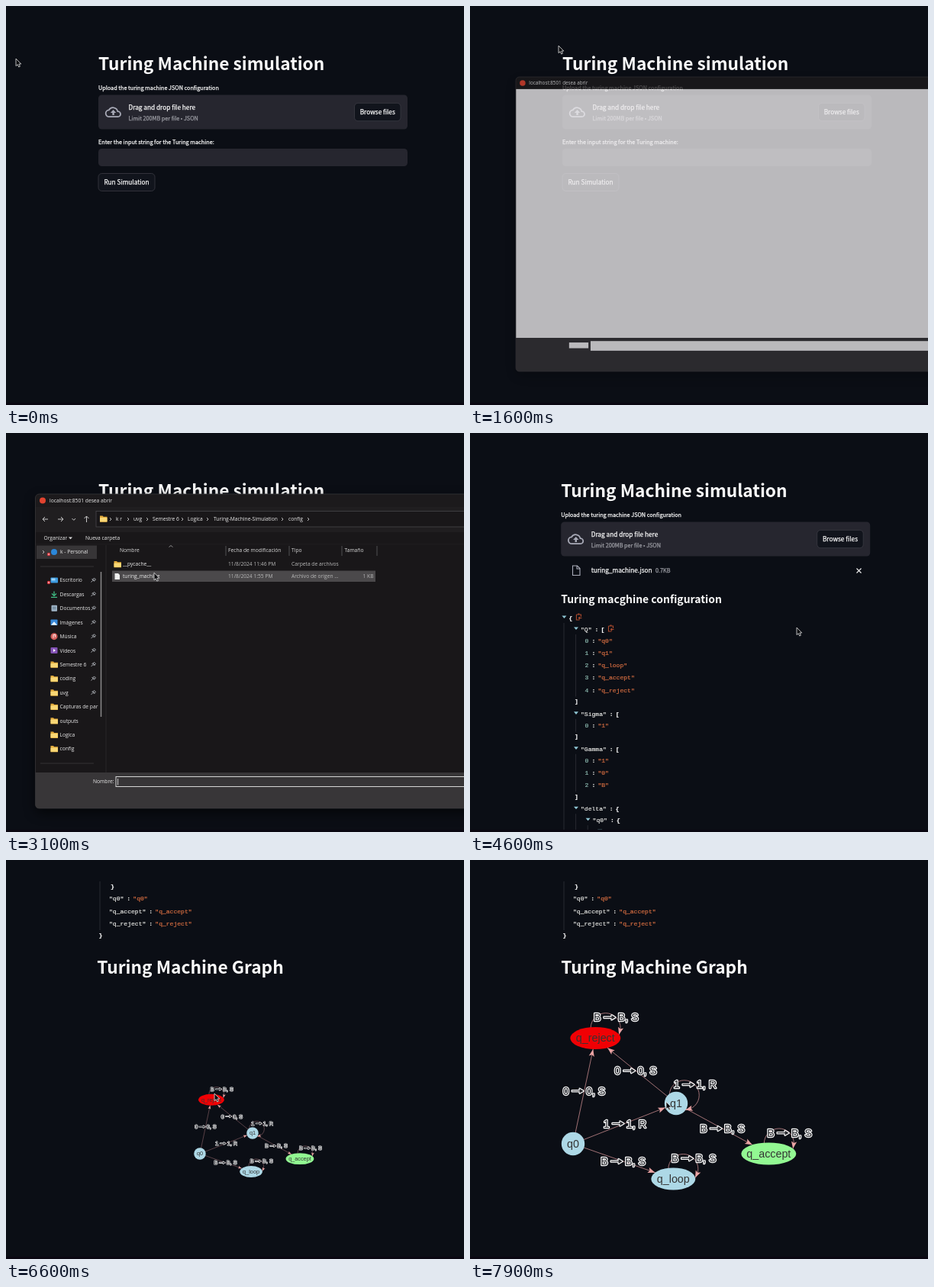
Animation of 600 by 523 pixels, one loop 8 s. Source, as an HTML page:

```html
<!DOCTYPE html>
<html lang="en">
<head>
<meta charset="utf-8">
<title>Turing Machine simulation</title>
<style>
  html, body { margin: 0; width: 100%; height: 100%; overflow: hidden; background: #0b0e15; }
  svg { display: block; width: 600px; height: 523px; }
  text { white-space: pre; }
  .sans { font-family: "Noto Sans CJK JP", "Noto Sans CJK SC", "Noto Sans CJK", "Open Sans", sans-serif; }
  .small { stroke-width: .25; }
  .mono { font: 8.05px "Liberation Mono", "DejaVu Sans Mono", monospace; }
  .mono text { stroke-width: .2; }
  .ui { font: 6.7px "Open Sans", "Noto Sans", sans-serif; }
  .graph { font: 14.3px "Liberation Sans", Arial, sans-serif; text-anchor: middle; }
  .edge { fill: #26272c; stroke: #fff; stroke-width: 2.4; stroke-linejoin: round; paint-order: stroke; }
</style>
</head>
<body>
<svg id="stage" viewBox="0 0 600 523">
  <defs><filter id="blur" x="-10%" y="-10%" width="120%" height="120%"><feGaussianBlur stdDeviation="8"/></filter></defs>
  <rect width="600" height="523" fill="#0b0e15"/>
  <g id="startPage" class="sans"></g>
  <g id="resultPage" class="sans"></g>
  <rect width="600" height="28" fill="#0b0e15"/>
  <rect y="520" width="600" height="3" fill="#0a0711"/>
  <g id="dialog" class="ui"></g>
  <path id="cursor" d="M0 0V9.6L2.2 7.7 3.7 11 5.4 10.2 3.9 7H6.8Z" fill="#0c0d10" stroke="#e4e4e4" stroke-width=".8" stroke-linejoin="round"/>
</svg>
<script>
const $ = id => document.getElementById(id);
const LOOP = 8000, STEP = 100;

const text = (x, y, s, fill = '#fafafa', extra = '') => `<text x="${x}" y="${y}" fill="${fill}" ${extra}>${s}</text>`;
const heading = (x, y, s, size) => text(x, y, s, '#fafafa', `font-size="${size}" font-weight="700"`);
const small = (x, y, s, size, fill = '#fafafa') => text(x, y, s, fill, `class="small" stroke="${fill}" font-size="${size}"`);
const rect = (x, y, w, h, fill, extra = '') => `<rect x="${x}" y="${y}" width="${w}" height="${h}" fill="${fill}" ${extra}/>`;
const line = (d, stroke, width = 1) => `<path d="${d}" fill="none" stroke="${stroke}" stroke-width="${width}"/>`;
const show = (id, on) => $(id).setAttribute('display', on ? 'inline' : 'none');

// ---- Web page ----
const button = (x, y, w, h, label, id) => `<g id="${id}" color="#fafafa" stroke="#3b3c45">` +
  rect(x, y, w, h, '#11141c', 'rx="4.6" stroke-width=".8"') +
  text(x + w / 2, y + h / 2 + 3.2, label, 'currentColor', 'class="small" stroke="currentColor" font-size="8.25" text-anchor="middle"') + '</g>';

function uploader(id) {
  return heading(121, 84, 'Turing Machine simulation', 22.7) +
    small(121, 110, 'Upload the turing machine JSON configuration', 7.25) +
    rect(121, 116.5, 405, 45, '#26262f', 'rx="4.6"') +
    `<g transform="translate(130 128.5) scale(.88)">
      <path d="M6 19a5 5 0 0 1-.5-10A7 7 0 0 1 18.5 11a4 4 0 0 1 .5 8z" fill="none" stroke="#a9abb8" stroke-width="2"/>
      <path d="M12 8.5l4.2 4.5h-2.8v3.5h-2.8V13H7.8z" fill="#a9abb8"/></g>` +
    small(160.5, 136, 'Drag and drop file here', 8.25) +
    small(160.5, 150, 'Limit 200MB per file • JSON', 7.25, '#9b9ca3') +
    button(456.5, 127.3, 60.5, 23.4, 'Browse files', id);
}

$('startPage').innerHTML = uploader('browse') +
  small(121, 181, 'Enter the input string for the Turing machine:', 7.25) +
  rect(121, 187, 405, 23, '#26262f', 'rx="4.6"') +
  button(121, 219.5, 74, 23, 'Run Simulation', 'run');

// ---- JSON tree ----
const tape = (state, symbol, move) => [state, symbol, move];
const halt = name => ({ B: tape(name, 'B', 'S') });
const machine = {
  Q: ['q0', 'q1', 'q_loop', 'q_accept', 'q_reject'],
  Sigma: ['1'],
  Gamma: ['1', '0', 'B'],
  delta: {
    q0: { 0: tape('q_reject', '0', 'S'), 1: tape('q1', '1', 'R'), B: tape('q_loop', 'B', 'S') },
    q1: { 0: tape('q_reject', '0', 'S'), 1: tape('q1', '1', 'R'), B: tape('q_accept', 'B', 'S') },
    q_loop: halt('q_loop'), q_accept: halt('q_accept'), q_reject: halt('q_reject')
  },
  q0: 'q0', q_accept: 'q_accept', q_reject: 'q_reject'
};
const CHAR = 4.83, INDENT = 15.6, ROW = 16.2;
let rowY = 242;

const copyIcon = (x, y) => line(`M${x} ${y - 3}h6v3M${x} ${y - 3}v7h4M${x + 2} ${y - 4}h2M${x + 7} ${y + 1.5}h-4m1.5-1.5l-1.5 1.5 1.5 1.5`, '#a84a2e', 1.1);

function tree(key, value, level, inArray) {
  const x = 123.4 + level * INDENT, leaf = typeof value === 'string';
  const keyX = leaf ? x - 4 : x + 6;
  const label = key === null ? '' : inArray ? key : `"${key}"`;
  const end = keyX + label.length * CHAR;
  const put = (px, s, fill, weight = 400) => text(px, rowY + 2.7, s, fill, `stroke="${fill}" font-weight="${weight}"`);
  let out = label && put(keyX, label, inArray ? '#8fbcb2' : '#e9e9e6') + put(end + 4, ':', '#f4f4f0', 700);
  const valueX = label ? end + 12 : keyX;
  if (leaf) return out + put(valueX, `"${value}"`, '#d96f42');

  const list = Array.isArray(value), top = rowY;
  out += `<path d="M${x - 3} ${top - 2.5}h6l-3 3.6z" fill="#8fc6d4"/>` + put(valueX, list ? '[' : '{', '#fafafa', 700);
  if (level === 0 || key === 'Q') out += copyIcon(valueX + 10, top - 1);
  rowY += 15;
  for (const [k, v] of Object.entries(value)) {
    out += tree(k, v, level + 1, list);
    rowY += ROW;
  }
  rowY -= 1.4;
  return out + line(`M${x - .4} ${top + 7}V${rowY - 6}`, '#30333a', .8) + put(x - 2, list ? ']' : '}', '#fafafa', 700);
}

// ---- State graph ----
const nodes = {
  q0: { x: 135, y: 372, rx: 15.2, ry: 15.2, fill: '#add8e6' },
  q1: { x: 270, y: 319, rx: 15.2, ry: 15.2, fill: '#add8e6' },
  q_reject: { x: 164.3, y: 233.5, rx: 33, ry: 14.6, fill: '#f00004' },
  q_loop: { x: 266.3, y: 418, rx: 29, ry: 14.6, fill: '#add8e6' },
  q_accept: { x: 391.3, y: 385, rx: 36, ry: 14.6, fill: '#92f892' }
};
const LOOP_RADIUS = 19.5;

const arrowHead = (x, y, angle) =>
  `<path d="M0 0L-9.5 -3.6 -7.5 0 -9.5 3.6z" fill="#eaa3a3" transform="translate(${x} ${y}) rotate(${angle * 180 / Math.PI})"/>`;

const edgeLabel = (x, y, read, rest) => `<g class="edge" transform="translate(${x} ${y})">` +
  '<text x="-19.9" y="5" text-anchor="end">' + read + '</text>' +
  '<path d="M-16 -.6h10v-2.400l5 3 -5 3v-2.400h-10z"/>' +
  '<text x="2.3" y="5" text-anchor="start">' + rest + '</text></g>';

function rim(n, angle) {
  const r = 1 / Math.hypot(Math.cos(angle) / n.rx, Math.sin(angle) / n.ry);
  return [n.x + r * Math.cos(angle), n.y + r * Math.sin(angle)];
}

function graph() {
  let edges = '', labels = '', heads = '';
  for (const [from, rules] of Object.entries(machine.delta)) {
    for (const [read, [to, write, move]] of Object.entries(rules)) {
      const a = nodes[from], b = nodes[to], rest = `${write}, ${move}`;
      if (a === b) {
        const [cx, cy] = rim(a, -Math.PI / 4);
        const at = turn => [cx + LOOP_RADIUS * Math.cos(turn), cy + LOOP_RADIUS * Math.sin(turn)];
        const outside = ([x, y]) => Math.hypot((x - a.x) / a.rx, (y - a.y) / a.ry) > 1;
        let turn = 0;
        while (outside(at(turn))) turn += .02;
        edges += `<circle cx="${cx}" cy="${cy}" r="${LOOP_RADIUS}" fill="none" stroke="#b27c7f" stroke-width=".9"/>`;
        heads += arrowHead(...at(turn), turn + Math.PI / 2 - .2);
        labels += edgeLabel(...at(-Math.PI / 4), read, rest);
      } else {
        const angle = Math.atan2(b.y - a.y, b.x - a.x);
        edges += line(`M${a.x} ${a.y}L${b.x} ${b.y}`, '#b27c7f', .9);
        heads += arrowHead(...rim(b, angle + Math.PI), angle);
        labels += edgeLabel((a.x + b.x) / 2, (a.y + b.y) / 2, read, rest);
      }
    }
  }
  const shapes = Object.entries(nodes).map(([name, n]) =>
    `<ellipse cx="${n.x}" cy="${n.y}" rx="${n.rx}" ry="${n.ry}" fill="${n.fill}"/>` +
    text(n.x, n.y + 4.6, name, '#343434')).join('');
  return edges + labels + shapes + heads;
}

const jsonTree = tree(null, machine, 0, false);
const SCROLL_END = rowY - 98;

$('resultPage').innerHTML = `<g transform="translate(-1.8 0)">${uploader('browseAgain')}</g>` +
  line('M134.5 174h6l3.5 3.5v9h-9.5zM140 174v4h4', '#a9abb8', 1.1) +
  small(158.7, 183, 'turing_machine.json', 8.25) +
  small(243, 183, '0.7KB', 7.25, '#9b9ca3') +
  line('M506.5 177.5l6 6m0-6l-6 6', '#fafafa', 1.1) +
  heading(119.2, 222.7, 'Turing macghine configuration', 13.95) +
  `<g class="mono">${jsonTree}</g><g transform="translate(0 ${SCROLL_END})">` +
  heading(119.2, 149, 'Turing Machine Graph', 22.7) +
  `<g id="graph" class="graph">${graph()}</g></g>`;

// ---- File dialog ----
const LIGHT = '#ececec', DIM = '#b9b9b9';
const ui = (x, y, s, fill = LIGHT, extra = '') => text(x, y + 2.4, s, fill, extra);
const folder = (x, y) => `<path d="M${x} ${y - 4}h3.5l1.2 1.3h4.8v7h-9.5z" fill="#e2ab3c"/>` + rect(x, y - 1.6, 9.5, 5.3, '#f8d775', 'rx=".6"');
const chevron = (x, y) => line(`M${x - 1} ${y - 2}l2 2-2 2`, '#d0d0d0', .9);
const badge = (x, y) => `<circle cx="${x}" cy="${y}" r="2.2" fill="#d8343c"/>` + line(`M${x - .8} ${y - .8}l1.6 1.6m0-1.6l-1.6 1.6`, '#fff', .6);
const pin = y => line(`M111.5 ${y + 2.5}l2-2m-1-2l3 3m-2-3.5l3 3m-2.5-2.5l1.5-1.5 2 2-1.5 1.5`, '#a9adb3', 1);

const places = {
  Escritorio: y => rect(58.5, y - 3.5, 9.5, 7, '#3d9be0', 'rx=".8"') + rect(59.5, y - 2.5, 5, 3, '#9bd4f7'),
  Descargas: y => line(`M63 ${y - 4}v6m-3-3l3 3 3-3M59 ${y + 4}h8`, '#3fba83', 1.3),
  Documentos: y => rect(59.5, y - 4, 7.5, 8, '#9fb4c6', 'rx=".8"') + line(`M61 ${y - 1.5}h4.5m-4.5 2h4.5`, '#496275', .8),
  'Imágenes': y => rect(58.5, y - 3.8, 9, 7.6, '#3587d8', 'rx=".8"') + `<path d="M59 ${y + 3.5}l4-4.5 4 4.5z" fill="#e8f4ff"/>`,
  'Música': y => `<circle cx="63" cy="${y}" r="4.5" fill="#d4605c"/>` + line(`M62 ${y + 2}v-4l2.5-.5v3.5`, '#fff', .9),
  'Vídeos': y => rect(58.5, y - 4, 9, 8, '#8453b5', 'rx="1"') + `<path d="M62 ${y - 2}l3 2-3 2z" fill="#fff"/>`
};
const sidebar = [...Object.keys(places), 'Semestre 6', 'coding', 'uvg', 'Capturas de par', 'outputs', 'Logica', 'config'];
const crumbs = [[144, 'k r', 160], [167, 'uvg', 185], [192, 'Semestre 6', 231], [238, 'Logica', 264], [272, 'Turing-Machine-Simulation', 362], [370, 'config']];
const columns = [[149, 'Nombre', 288], [291, 'Fecha de modificación', 371], [374, 'Tipo', 440], [443.5, 'Tamaño', 486]];

const fileRow = (y, name, date, kind, size) => ui(153, y, name) + ui(291, y, date, DIM) + ui(374, y, kind, DIM) +
  ui(481.5, y, size, DIM, 'text-anchor="end"');
const footer = fill => `<path d="M38.5 445h682v47h-677q-5 0-5-5z" fill="${fill}"/>`;

const content =
  rect(38.5, 97, 682, 34, '#201e20') + rect(38.5, 130, 682, 315, '#191719') +
  rect(38.5, 145.5, 682, .8, '#222022') +
  line('M55 113h-7m3-3l-3 3 3 3M68 113h7m-3-3l3 3-3 3M86.5 112l2.3 2.3 2.3-2.3M105.5 117v-8m-3 3l3-3 3 3', '#c9c9c9', 1) +
  rect(118, 102.5, 600, 20.5, '#191719', 'stroke="#48464a" stroke-width=".8"') +
  folder(123, 112.5) + chevron(137, 113) +
  crumbs.map(([x, s, next]) => ui(x, 113, s) + (next ? chevron(next, 113) : '')).join('') +
  `<g id="lastCrumb">${chevron(396, 113)}</g>` +
  ui(49.5, 138, 'Organizar') + '<path d="M82 136.5h5l-2.5 2.8z" fill="#ddd"/>' + ui(104, 138, 'Nueva carpeta') +
  rect(40, 147.5, 79, 17.5, '#373537') + chevron(49, 156) +
  '<circle cx="63" cy="156" r="4" fill="#2b87d9"/>' + ui(71, 156, 'k - Personal') +
  line('M45 175h70M45 433h70', '#3b393b', .8) +
  sidebar.map((name, i) => {
    const y = 193 + i * 18.42;
    return (places[name] ? places[name](y) : folder(58.5, y)) + ui(70.5, y, name) + (i < 9 ? pin(y) : '');
  }).join('') +
  `<g id="badges">${badge(56, 159)}${badge(56, 196)}</g>` +
  line('M124.5 182V372', '#8b898b', 1.5) + line('M131 147V445', '#2d2b2d', .8) +
  columns.map(([x, s, edge]) => ui(x, 154, s, '#dcdcdc') + line(`M${edge} 148v13`, '#59575a', .9)).join('') +
  line('M213.5 149.5l2.5-2 2.5 2', '#aaa', .8) +
  rect(139, 180.5, 345, 14.5, '#4b494b', 'id="rowHover"') +
  folder(141.5, 172) + fileRow(172, '__pycache__', '11/8/2024 11:46 PM', 'Carpeta de archivos', '') +
  '<path d="M142.5 184h4.5l2 2v6h-6.5z" fill="#eee"/>' +
  fileRow(188, 'turing_machine', '11/8/2024 1:55 PM', 'Archivo de origen ...', '1 KB') +
  footer('#383638') +
  ui(114, 457, 'Nombre:') + rect(144, 450.5, 600, 13, '#373537', 'stroke="#d5d5d5" stroke-width="1"') +
  rect(146.3, 453, .8, 8.5, '#eee', 'id="caret"');

const BLANK = '#ebe9eb';
const placeholder = rect(38.5, 97, 682, 348, BLANK) + footer('#343236') +
  rect(113, 451.5, 27, 8, BLANK) + rect(143, 449.5, 600, 13.5, BLANK);

$('dialog').innerHTML = rect(38.5, 86, 682, 412, '#000', 'rx="6" opacity=".6" filter="url(#blur)" id="shadow"') +
  rect(38.5, 80, 682, 412, '#1c1a1c', 'rx="5" id="frame"') +
  `<g id="placeholder">${placeholder}</g><g id="content">${content}</g>` +
  '<circle cx="48" cy="88.5" r="4" fill="#e2432f"/>' + ui(57, 88.5, 'localhost:8501 desea abrir') +
  rect(38.5, 80, 682, 412, 'none', 'rx="5" stroke="#3c3a3d" stroke-width=".7"');

// ---- Motion: each track is a list of [time, ...values] ----
const pointer = [[0, 13, 69], [400, 150, 200], [600, 290, 222], [900, 502, 150], [1000, 488, 140], [1200, 484, 138],
  [1600, 116, 52], [1800, 49, 79], [1900, 45, 66], [2200, 70, 95], [2700, 178, 174], [3000, 194, 183], [3600, 194, 184],
  [4300, 428, 255], [4700, 428, 255], [5400, 345, 300], [5900, 340, 310], [6500, 273, 306], [6700, 273, 306],
  [7300, 294, 329], [7500, 294, 329], [7900, 257, 317]];
const windowPose = [[1600, .937, .78], [1700, .985, 1], [1800, 1, 1], [3500, 1, 1], [3600, .94, .4]];
const zoom = [[6700, .511, 185, 194.9], [7300, 1, 37, 12], [7500, 1, 37, 12], [7900, 1, 0, 0]];

function sample(track, t) {
  const i = track.findIndex(k => k[0] > t);
  if (i === 0) return track[0].slice(1);
  if (i < 0) return track[track.length - 1].slice(1);
  const a = track[i - 1], b = track[i], p = (t - a[0]) / (b[0] - a[0]);
  return a.slice(1).map((v, j) => v + (b[j + 1] - v) * p);
}

function draw(t) {
  const [px, py] = sample(pointer, t);
  $('cursor').setAttribute('transform', `translate(${px} ${py})`);

  const uploaded = t >= 3900;
  show('startPage', !uploaded);
  show('resultPage', uploaded);
  const overBrowse = t >= 1000 && t <= 1200;
  $('browse').setAttribute('stroke', overBrowse ? '#ff4b4b' : '#3b3c45');
  $('browse').setAttribute('color', overBrowse ? '#ff4b4b' : '#fafafa');

  const p = Math.min(1, Math.max(0, (t - 4600) / 1300));
  $('resultPage').setAttribute('transform', `translate(0 ${-SCROLL_END * p * p * (3 - 2 * p)})`);
  const [scale, gx, gy] = sample(zoom, t);
  $('graph').setAttribute('transform', `translate(${gx} ${gy}) scale(${scale})`);

  show('dialog', t >= 1600 && t < 3700);
  const [size, alpha] = sample(windowPose, t);
  $('dialog').setAttribute('transform', `translate(380 286) scale(${size}) translate(-380 -286)`);
  $('dialog').setAttribute('opacity', alpha);
  const loading = t < 1700;
  show('placeholder', loading);
  show('content', !loading);
  // While it fades in, the window has no opaque backing or inner shadow.
  $('shadow').setAttribute('opacity', loading ? .3 : .6);
  show('lastCrumb', t >= 2000);
  show('badges', t >= 2000);
  show('rowHover', py >= 180 && py <= 195);
  show('caret', Math.floor((t - 1800) / 500) % 2 === 0);
}

function tick(now) {
  draw(Math.floor(now % LOOP / STEP) * STEP);
  requestAnimationFrame(tick);
}
draw(0);
requestAnimationFrame(tick);
</script>
</body>
</html>
```
